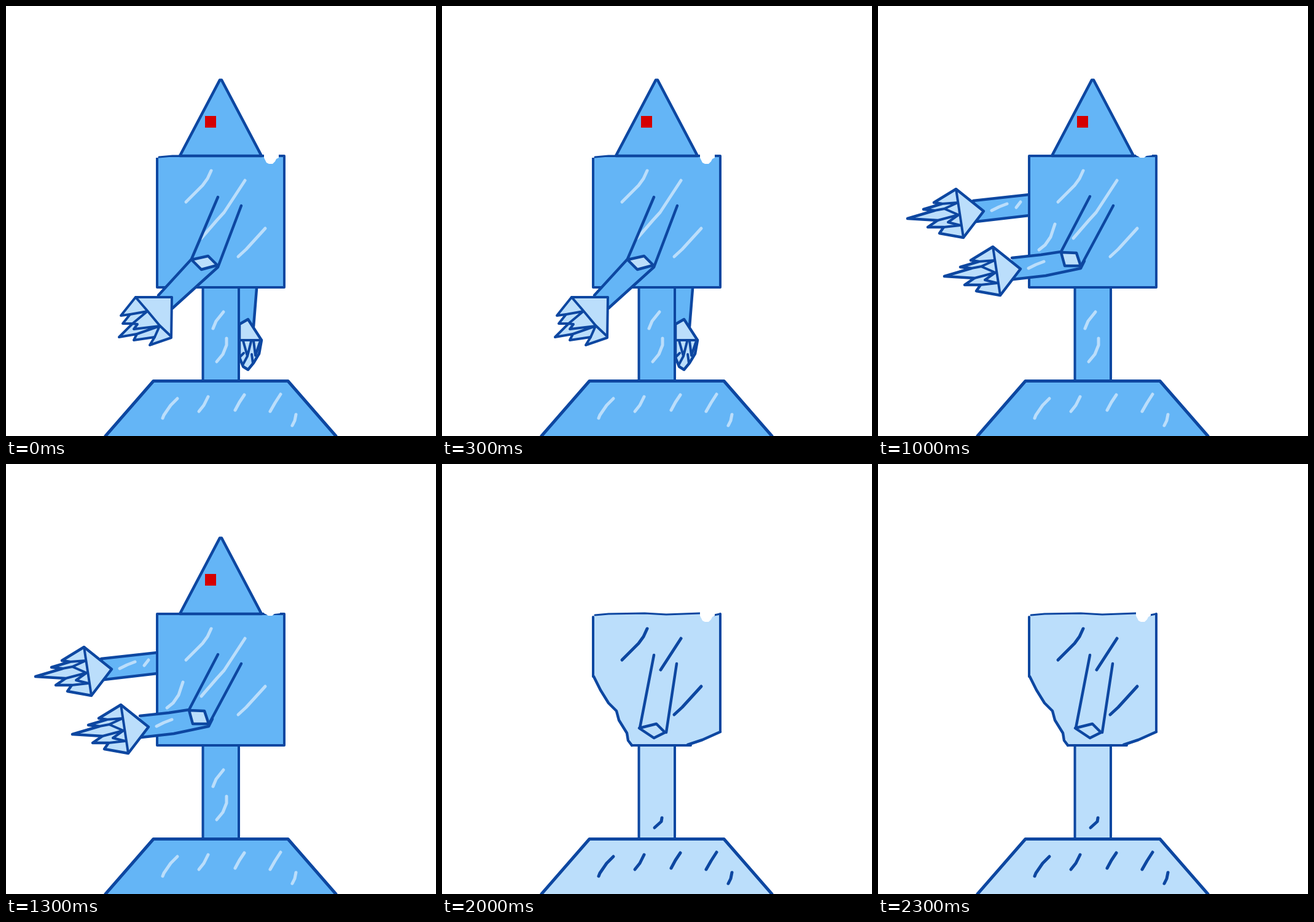
An HTML page with a canvas that plays this animation: 700 px wide and 700 px high, repeating every 2.5 s.

```html
<!DOCTYPE html>
<html lang="en">
<head>
<meta charset="utf-8">
<title>Robot</title>
<style>
html, body { margin: 0; width: 100%; height: 100%; overflow: hidden; background: #fff; }
canvas { display: block; width: 700px; height: 700px; }
</style>
</head>
<body>
<canvas id="stage" width="700" height="700"></canvas>
<script>
const ctx = document.getElementById('stage').getContext('2d');
const INK = '#0d47a1', BLUE = '#64b5f6', PALE = '#bbdefb', RED = '#d50000', WHITE = '#fff';
const POSE_MS = 500;

// The robot is blue while alive and pale once it breaks down.
const LIVE = { metal: BLUE, joint: PALE, shine: PALE };
const DEAD = { metal: PALE, joint: WHITE, shine: INK };

function fill(path, color) {
  ctx.fillStyle = color;
  ctx.fill(new Path2D(path));
}

function line(path, color = INK, width = 4.5) {
  ctx.strokeStyle = color;
  ctx.lineWidth = width;
  ctx.stroke(new Path2D(path));
}

function shape(path, color, width) {
  fill(path, color);
  line(path, INK, width);
}

function shines(paths, skin) {
  paths.forEach(path => line(path, skin.shine, 5));
}

function base(skin) {
  shape('M162 700L240 610.5H459L537 700', skin.metal, 5);
  shines([
    'M255 671L257 666L268 650L279 639', 'M314 660L322 650L329 636',
    'M373 658L380 645L388 633', 'M430 660L438 646L447 632', 'M466 683L470 675L472 665'
  ], skin);
}

function neck(skin, marks) {
  fill('M320 458H379V608H320Z', skin.metal);
  line('M320.5 458V609M379 458V609', INK, 4);
  shines(marks, skin);
}

function head(skin, x = 0, y = 0, outline = 'M283 244L348 120.5H351L416 244Z') {
  fill(outline, skin.metal);
  line(outline, INK, 4.6);
  ctx.fillStyle = RED;
  ctx.fillRect(324 + x, 179 + y, 18, 19);
}

function bite() {
  fill('M420 239V247L424 255L428 257H434L438 253L440 249L444 247V239Z', WHITE);
}

function wornTop() {
  fill('M243 240H283V243L271 244L248 247H243Z', WHITE);
  line('M249 246L271 244H281', INK, 3);
}

function body(skin, worn) {
  shape('M246 244H453V458H246Z', skin.metal, 4);
  if (worn) {
    wornTop();
    bite();
  } else {
    fill('M420 241H446V243L437 244L433 247H427L424 245L420 243Z', WHITE);
  }
}

const chestShines = ['M293 319L320 292L328 281L334 268', 'M378 408L391 396L422 362'];
const longShine = 'M389 284L355 336L344 348L318 378';
const sideShine = 'M262 397L272 389L281 376L288 355';
const neckShines = ['M337 525L342 513L354 498', 'M343 579L353 567L359 552V541'];

function loweredArm(skin, elbow) {
  fill('M302 413L248 471L271 492L345 425L318 429Z', skin.metal);
  line('M345 311L302 412L248 471M383 325L345 425L271 492');
  shape('M302 413L329 407L344 422L318 429Z', elbow);
}

function loweredHand(skin) {
  shape('M211 474L187 504L202 502L190 517L206 517L184 539L213 534L208 544L242 539L234 552L269 540L270 474Z', skin.joint, 4);
  line('M211 474L230 496L250 520L269 538M202 502L230 497L206 517M206 517L214 518L208 526L250 521L213 534M250 521L242 539', INK, 4);
}

function backArm(skin) {
  fill('M380 460H408L403 522L380 520Z', skin.metal);
  line('M408 460L403 522');
  shape('M380 518L394 510L416 544L412 566L403 581L394 592L386 587L380 572Z', skin.joint);
  line('M380 544H416M386 545L393 570L399 546M403 545L406 569L413 548M393 570L386 583M400 567L402 582M381 571L387 565', INK, 4);
  line('M379 460V609', INK, 4);
}

function raisedHand(x, y) {
  ctx.save();
  ctx.translate(x, y);
  shape('M127 298L91 320L104 322L74 331L92 333L48 346L97 349L81 360L107 360L100 370L139 377L172 334Z', PALE);
  line('M127 298L139 377M104 322L130 320L108 330L92 333M108 330L131 340L97 349M131 340L114 352L134 357L107 360', INK, 4);
  ctx.restore();
}

function farArm() {
  shape('M246 307L155 317L160 351L246 341', BLUE);
  raisedHand(0, 0);
  shines(['M185 333L197 327L210 322', 'M225 328L232 319'], LIVE);
}

function raisedArm() {
  fill('M298 401L218 410L220 445L273 439L330 427Z', BLUE);
  line('M345 310L298 400L265 405L218 410M383 325L331 422M336 415L330 427L273 439L220 445');
  shape('M298 401L323 402L330 423L304 423Z', PALE);
  raisedHand(60, 94);
  shines(['M245 427L257 421L270 416'], LIVE);
}

function resting(skin, elbow, marks) {
  base(skin);
  neck(skin, marks);
  backArm(skin);
  body(skin, true);
  shines([...chestShines, longShine], skin);
  loweredArm(skin, elbow);
  loweredHand(skin);
}

function idle() {
  resting(LIVE, PALE, neckShines);
  head(LIVE);
}

function reaching(bothArms) {
  base(LIVE);
  neck(LIVE, neckShines);
  farArm();
  body(LIVE, false);
  shines([...chestShines, longShine, sideShine], LIVE);
  if (bothArms) {
    raisedArm();
  } else {
    loweredArm(LIVE, PALE);
    loweredHand(LIVE);
    shines(['M288 457L291 447L300 434'], LIVE);
  }
  head(LIVE);
}

function beheaded() {
  resting(DEAD, PALE, [
    'M339 503L346 494L359 486', 'M339 555L345 545L350 534L349 527', 'M346 592L357 582L358 576'
  ]);
  head(DEAD, 1, -34, 'M285 206L349 86.5H352L417 206Z');
}

function wreck() {
  base(DEAD);
  neck(DEAD, ['M346 592L357 582L358 576']);
  fill('M246 248L271 244L330 243L365 245L420 244H453V436L424 449L400 458H309L302 438L290 420L284 402L267 386L246 346Z', PALE);
  line('M246 249V346M453 244V436M309 458H405', INK, 4);
  line('M247 346L258 368L271 389L284 402L288 417L301 438L303 450L309 458M453 436L424 449L400 457');
  line('M249 246L271 244L330 243L365 245L420 243M443 246L453 244', INK, 3);
  bite();
  shines([...chestShines, 'M389 284L356 335'], DEAD);
  line('M345 311L322 430M382 325L365 437');
  shape('M321 430L349 423L363 437L345 446Z', PALE);
}

const poses = [idle, () => reaching(false), () => reaching(true), beheaded, wreck];

function draw(elapsed) {
  ctx.fillStyle = WHITE;
  ctx.fillRect(0, 0, 700, 700);
  ctx.lineCap = ctx.lineJoin = 'round';
  poses[Math.floor(elapsed / POSE_MS) % poses.length]();
}

const start = performance.now();

function tick() {
  draw(performance.now() - start);
  requestAnimationFrame(tick);
}
tick();
</script>
</body>
</html>
```
